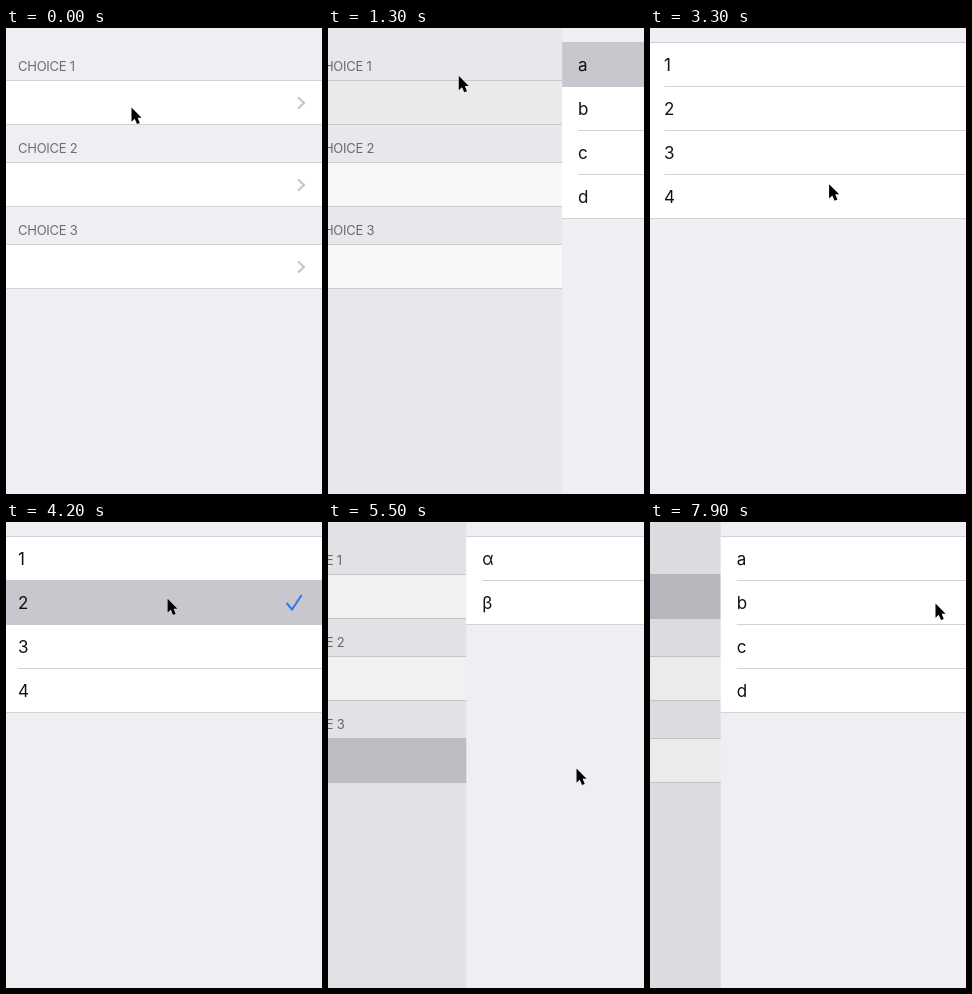
An HTML page for the animation above (8000 ms loop, 316 by 466 pixels).

```html
<!DOCTYPE html>
<html lang="en">
<head>
<meta charset="utf-8">
<title>Choice pickers</title>
<style>
  html, body { margin: 0; width: 100%; height: 100%; overflow: hidden; background: #eeeef3; }
  svg { display: block; width: 100%; height: 100%; }
  text { font: 17px Inter, "Open Sans", sans-serif; fill: #111; }
  .head { font-size: 13px; letter-spacing: -.25px; fill: #6d6d72; }
  .value { fill: #8a8a8f; text-anchor: end; }
  .line { fill: #d2d1d6; }
  .hit { fill: #c8c7cd; }
  .mark { fill: none; stroke-width: 2; }
</style>
</head>
<body>
<svg id="stage" viewBox="0 0 316 466"></svg>
<script>
const W = 320, H = 466, LEFT = -4;   // the view is 4px wider than the stage
const LOOP = 8000, STEP = 100;
const PARALLAX = 99, DIM = 0.1, SPRING = 0.014;

const lists = [['a', 'b', 'c', 'd'], ['1', '2', '3', '4'], ['α', 'β']];

// One entry per opened picker, times in ms
const visits = [
  { row: 0, press: 100, push: 220, pick: 1000, pop: 1110, item: 0 },
  { row: 1, press: 2700, push: 2790, pick: 4150, pop: 4290, item: 1 },
  { row: 2, press: 5200, push: 5367, pick: 6150, pop: 6289, item: 1 },
  { row: 0, press: 7500, push: 7701, pick: 9000, pop: 9100, item: 1 }
];

// Cursor stops: time, x, y
const path = [
  [0, 125, 79], [400, 125, 79], [800, 126, 39], [1200, 126, 39],
  [1800, 183, 152], [2100, 183, 152], [2200, 180, 162], [3200, 180, 162],
  [3800, 161, 76], [4400, 161, 76], [5000, 248, 246], [5500, 248, 246],
  [6000, 156, 85], [6600, 156, 85], [7000, 285, 81], [8000, 285, 81]
];

const stage = document.getElementById('stage');

function add(parent, tag, attrs, text) {
  const el = document.createElementNS('http://www.w3.org/2000/svg', tag);
  for (const key in attrs) el.setAttribute(key, attrs[key]);
  if (text) el.textContent = text;
  return parent.appendChild(el);
}
const rect = (parent, x, y, width, height, attrs) =>
  add(parent, 'rect', { x, y, width, height, ...attrs });
const line = (parent, x, y) => rect(parent, x, y, W - x, 1, { class: 'line' });
const move = (el, x, y = 0) => el.setAttribute('transform', `translate(${x} ${y})`);
const fade = (el, a) => el.setAttribute('opacity', a);

// Menu with three sections
const menu = add(stage, 'g', {});
rect(menu, 0, 0, W, H, { fill: '#eeeef3' });
const rows = lists.map((_, i) => {
  const y = 52 + i * 82;
  add(menu, 'text', { x: 16, y: y - 9.4, class: 'head' }, `CHOICE ${i + 1}`);
  rect(menu, 0, y, W, 45, { fill: '#fff' });
  line(menu, 0, y);
  line(menu, 0, y + 44);
  const hit = rect(menu, 0, y, W, 45, { class: 'hit' });
  const value = add(menu, 'text', { x: 285.5, y: y + 29, class: 'value' });
  add(menu, 'path', { d: `M296 ${y + 17.5}l6 5.5-6 5.5`, class: 'mark', stroke: '#c3c3c8' });
  return { hit, value };
});
const shade = rect(menu, 0, 0, W, H, { fill: '#000' });

// Pickers that slide in from the right
const pickers = lists.map(items => {
  const g = add(stage, 'g', {});
  rect(g, 0, 0, W, H, { fill: '#eeeef3' });
  rect(g, 0, 14, W, items.length * 44, { fill: '#fff' });
  line(g, 0, 14);
  items.forEach((_, i) => line(g, i < items.length - 1 ? 16 : 0, 58 + i * 44));
  const hit = rect(g, 0, 0, W, 45, { class: 'hit' });
  items.forEach((s, i) => add(g, 'text', { x: 16, y: 43 + i * 44 }, s));
  const check = add(g, 'path', {
    d: 'M285 23.5l5 6 9.3-14', class: 'mark', stroke: '#2f7af2', 'stroke-linecap': 'round'
  });
  return { g, hit, check };
});

const cursor = add(stage, 'path', {
  d: 'M.5 .5V14.8L3.7 11.8 6 17 8.8 15.9 6.6 10.7H10.6Z',
  fill: '#000', stroke: '#fff', 'stroke-width': 1, 'paint-order': 'stroke'
});

// Critically damped spring from 0 to 1
function spring(ms) {
  if (ms <= 0) return 0;
  const k = ms * SPRING;
  const p = 1 - (1 + k) * Math.exp(-k);
  return p > 0.994 ? 1 : p;
}

function cursorAt(t) {
  const i = path.findIndex(stop => stop[0] > t);
  const [t0, x0, y0] = path[i - 1], [t1, x1, y1] = path[i];
  const u = (t - t0) / (t1 - t0), e = u * u * (3 - 2 * u);
  return [x0 + (x1 - x0) * e, y0 + (y1 - y0) * e];
}

function draw(t) {
  const visit = visits.filter(v => t >= v.press).pop();
  const chosen = [];
  for (const v of visits) if (t >= v.pick) chosen[v.row] = v.item;
  const open = visit ? spring(t - visit.push) - spring(t - visit.pop) : 0;

  move(menu, LEFT - PARALLAX * open);
  fade(shade, DIM * open);

  rows.forEach(({ hit, value }, i) => {
    const active = visit && visit.row === i;
    fade(hit, active ? (t < visit.pop ? 1 : open) : 0);
    value.textContent = i in chosen ? lists[i][chosen[i]] : '';
  });

  pickers.forEach(({ g, hit, check }, i) => {
    const shown = visit && visit.row === i && open > 0;
    g.setAttribute('display', shown ? 'inline' : 'none');
    if (!shown) return;
    move(g, LEFT + W * (1 - open));
    const y = 44 * (chosen[i] || 0);
    move(hit, 0, 14 + y);
    move(check, 0, 14 + y);
    fade(hit, t >= visit.pick ? 1 : 0);
    fade(check, i in chosen ? 1 : 0);
  });

  move(cursor, ...cursorAt(t));
}

const start = performance.now();
function tick() {
  const t = (performance.now() - start) % LOOP;
  draw(Math.floor(t / STEP) * STEP);
  requestAnimationFrame(tick);
}
tick();
</script>
</body>
</html>
```
